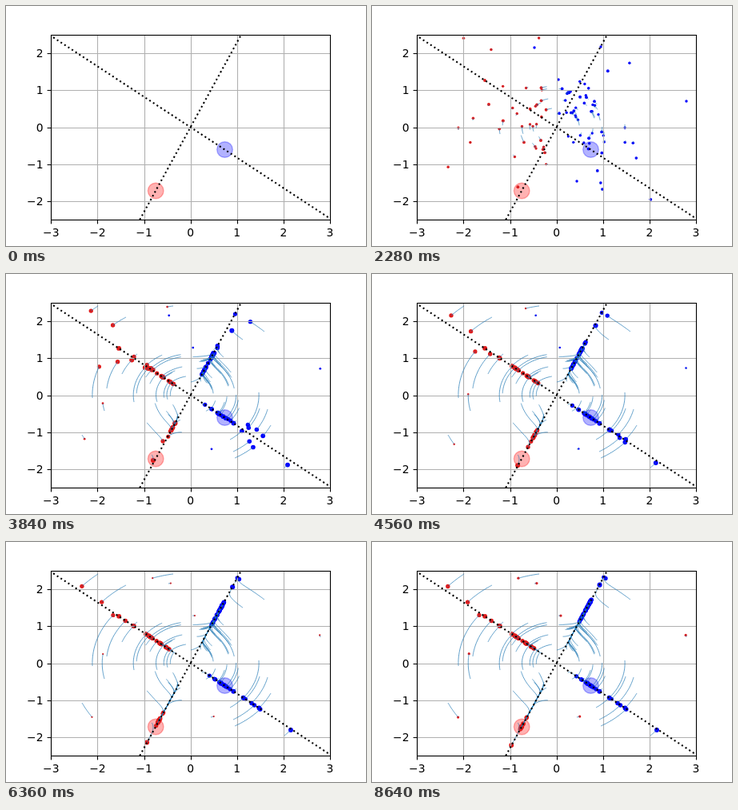
An HTML page for the animation above (8760 ms loop, 450 px wide and 300 px high).

```html
<!DOCTYPE html>
<html lang="en">
<head>
<meta charset="utf-8">
<title>Drifting points</title>
<style>
  html, body { margin: 0; width: 100%; height: 100%; overflow: hidden; background: #fff; }
  svg { display: block; width: 450px; height: 300px; }
  text { font: 13.89px "DejaVu Sans", sans-serif; fill: #000; }
  .grid { stroke: #b0b0b0; stroke-width: 1.11; }
  .axis { stroke: #000; stroke-width: 1.11; fill: none; }
  .ray { stroke: #000; stroke-width: 2.083; stroke-dasharray: 2.083 3.437; }
  .trail { stroke: #1f77b4; stroke-width: .7; fill: none; }
</style>
</head>
<body>
<svg viewBox="0 0 450 300">
  <clipPath id="box"><rect x="56.25" y="36" width="348.75" height="231"/></clipPath>
  <g clip-path="url(#box)">
    <g fill-opacity=".3" stroke-opacity=".3" stroke-width="1.39">
      <circle cx="273.5" cy="179.5" r="9.8" fill="#00f" stroke="#00f"/>
      <circle cx="187.2" cy="231" r="9.8" fill="#f00" stroke="#f00"/>
    </g>
    <g id="dots"></g>
    <g id="grid" class="grid"></g>
    <path id="trails" class="trail"/>
    <path class="ray" d="M-1 -.05L451 295.7"/>
    <path class="ray" d="M148.7 301L313.1 1"/>
  </g>
  <rect class="axis" x="56.5" y="36.5" width="349" height="231"/>
  <g id="ticks" class="axis"></g>
  <g id="labels"></g>
</svg>
<script>
const STEP = 120, STEPS = 73;
const OX = 230.625, OY = 151.5, UX = 58.125, UY = 46.2;
const RED = '#e01c1c', BLUE = '#0000ff';
const RAD = Math.PI / 180;

// starting places of the outer points; the inner ones are random
const outer = [
  [115, 40], [150, 54], [126, 143], [108, 155], [141, 93], [145, 125], [164, 100], [182, 226],
  [286, 51], [323, 72], [296, 82], [316, 148], [317, 168], [327, 169], [331, 189],
  [280, 207], [284, 222], [286, 230], [348, 242]
];
// points that hardly turn
const weak = [[209, 40], [123, 171], [95, 201], [393, 119], [203, 52], [256, 219], [233, 92]];

const svg = document.querySelector('svg');
const byId = id => document.getElementById(id);
function add(parent, tag, attrs, text) {
  const el = document.createElementNS(svg.namespaceURI, tag);
  for (const key in attrs) el.setAttribute(key, attrs[key]);
  if (text) el.textContent = text;
  parent.appendChild(el);
  return el;
}

const snap = v => Math.floor(v + .5) + .5;
const label = v => (v < 0 ? '\u2212' : '') + Math.abs(v);
for (let v = -3; v <= 3; v++) {
  const x = OX + v * UX, y = OY - v * UY;
  add(byId('grid'), 'path', { d: `M${snap(x)} 36V267` });
  add(byId('ticks'), 'path', { d: `M${snap(x)} 267.5v4.9` });
  add(byId('labels'), 'text', { x, y: 288, 'text-anchor': 'middle' }, label(v));
  if (Math.abs(v) > 2) continue;
  add(byId('grid'), 'path', { d: `M56 ${snap(y)}H405` });
  add(byId('ticks'), 'path', { d: `M56.5 ${snap(y)}h-4.9` });
  add(byId('labels'), 'text', { x: 46.5, y: Math.round(y + 5.1), 'text-anchor': 'end' }, label(v));
}

let seed = 11;
function random(min, max) {
  seed = (seed * 1664525 + 1013904223) % 2 ** 32;
  return min + (max - min) * seed / 2 ** 32;
}

// points first turn onto a ray, then slide outwards along it
function turnTime(n) {
  const t = 10 ** ((n - 32) / 9);
  return t / (1 + t / 3);
}
const slide = n => 1.1 / (1 + Math.exp((40 - n) / 7.5));

function polar([x, y]) {
  const u = (x - OX) / UX, v = (OY - y) / UY;
  const angle = Math.atan2(v, u) / RAD;
  return [Math.hypot(u, v), angle < -90 ? angle + 360 : angle];
}
const place = (r, a) => [OX + UX * r * Math.cos(a * RAD), OY - UY * r * Math.sin(a * RAD)];

function goalOf(red, angle) {
  if (red) return angle < 195 ? 140.5 : 246.4;
  return angle < 3.5 ? -39.5 : 66.4;
}
function growthOf(goal, r) {
  if (goal === 66.4) return Math.max(.1, 1.05 - .36 * r);
  if (goal === 246.4) return Math.max(.15, 1.35 - .45 * r);
  return Math.max(0, .35 * (1 - r));
}
function mover(r, angle, red, power) {
  const goal = goalOf(red, angle);
  const rate = 6 * power / Math.max(r, .7) ** 2;
  const growth = growthOf(goal, r) * power;
  return n => {
    const left = Math.exp(-rate * turnTime(n));
    return place(r + growth * slide(n) * (1 - left), goal + (angle - goal) * left);
  };
}

function strongPoint(r, angle) {
  const red = angle > 90, power = random(.8, 1.15);
  return {
    at: mover(r, angle, red, power),
    size: n => 1.8 * (.4 + .6 * power) * (1 + .6 * Math.min(1, turnTime(n) / .75)),
    color: () => red ? RED : BLUE
  };
}
function weakPoint(start, i) {
  const red = i < 3;
  return {
    at: mover(...polar(start), red, red ? .1 : .01),
    size: n => 1 + Math.abs(n - 47) / 40,
    color: n => red || n > 47 ? RED : BLUE
  };
}

const points = [...outer.map(p => strongPoint(...polar(p))), ...weak.map(weakPoint)];
for (let i = 0; i < 26; i++) points.push(strongPoint(random(.4, 1.25), random(95, 265)));
for (let i = 0; i < 40; i++) points.push(strongPoint(random(.35, 1.35), random(-55, 90)));
for (const p of points) {
  p.el = add(byId('dots'), 'circle', {});
  p.path = Array.from({ length: STEPS }, (_, n) => p.at(n));
}

function draw(n) {
  byId('dots').style.display = n ? '' : 'none';
  let d = '';
  for (const p of points) {
    const [x, y] = p.path[n];
    p.el.setAttribute('cx', x);
    p.el.setAttribute('cy', y);
    p.el.setAttribute('r', p.size(n));
    p.el.setAttribute('fill', p.color(n));
    if (n) d += 'M' + p.path.slice(0, n + 1).map(q => q.map(v => v.toFixed(2)).join(' ')).join('L');
  }
  byId('trails').setAttribute('d', d);
}

let shown = -1;
const start = performance.now();
function tick() {
  const n = Math.floor((performance.now() - start) / STEP) % STEPS;
  if (n !== shown) draw(shown = n);
  requestAnimationFrame(tick);
}
tick();
</script>
</body>
</html>
```
